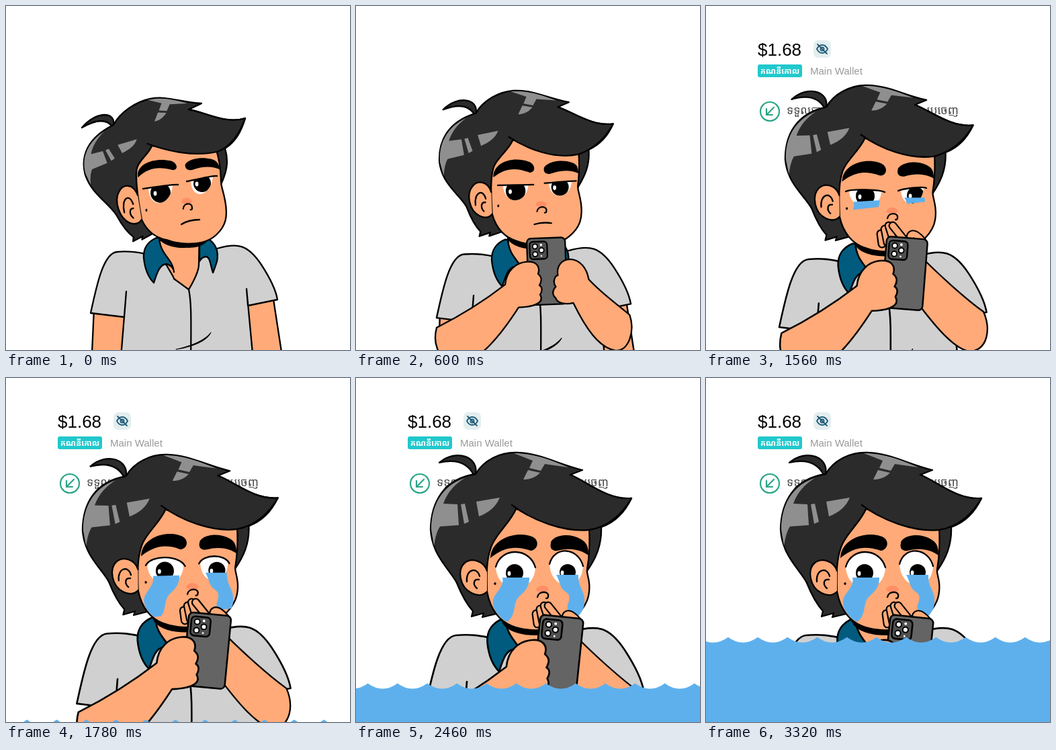
An HTML page that plays this animation: 512 px wide and 512 px high, repeating every 3.34 s.

```html
<!DOCTYPE html>
<html lang="en">
<head>
<meta charset="utf-8">
<title>Wallet tears</title>
<style>
  html, body { margin: 0; width: 100%; height: 100%; overflow: hidden; background: #fff; }
  svg { display: block; width: 100vw; height: 100vh; }
  text { font-family: "Liberation Sans", Arial, sans-serif; }
  .khmer { font-family: "Noto Sans Khmer", "Noto Sans", sans-serif; }
  .ink { stroke: #000; stroke-width: 2.3; stroke-linejoin: round; stroke-linecap: round; }
  .line { fill: none; }
  .skin { fill: #ffaa78; }
  .shirt { fill: #d0d0d0; }
  .collar { fill: #005b7f; }
  .hair { fill: #2b2b2b; }
  .shine { fill: #8f8f8f; }
  .tear { fill: #5eb0ed; }
  .blush { fill: #ff8f66; }
</style>
</head>
<body>
<svg viewBox="0 0 512 512">
  <defs>
    <clipPath id="tearClip"><path/></clipPath>
    <clipPath id="eyeClip0"><path/></clipPath>
    <clipPath id="eyeClip1"><path/></clipPath>
  </defs>

  <g id="wallet">
    <text x="77" y="74" font-size="26">$1.68</text>
    <rect x="160" y="51" width="26" height="26" rx="7" fill="#e3eeef"/>
    <g fill="none" stroke="#1f5a78" stroke-width="1.8" stroke-linecap="round">
      <path d="M165,64C169,56 177,56 181,64C177,72 169,72 165,64zM166,57L180,71"/>
      <circle cx="173" cy="64" r="2.6"/>
    </g>
    <rect x="77" y="87" width="66" height="19" rx="3" fill="#20c8cc"/>
    <text class="khmer" x="110" y="101" font-size="12" font-weight="600" fill="#fff" text-anchor="middle">គណនីគោល</text>
    <text x="155" y="102" font-size="15" fill="#999">Main Wallet</text>
    <g fill="none" stroke="#2aa587" stroke-width="2.2" stroke-linecap="round">
      <circle cx="95" cy="157" r="14"/>
      <path d="M101,151L90,162M90,153V162H99"/>
    </g>
    <g class="khmer" font-size="17" font-weight="500" fill="#444">
      <text class="khmer" x="120" y="161">ទទួលបាន</text>
      <text class="khmer" x="376" y="161" text-anchor="end">ប្រចេញ</text>
    </g>
  </g>

  <g id="body" class="ink">
    <g id="upperArms" class="skin">
      <path d="M131,450L126,560H170L178,440z"/>
      <path d="M358,430L371,560H417L397,430z"/>
    </g>
    <path class="shirt" d="M126,457C135,415 145,368 165,366C185,364 198,367 208,369L270,385L314,361C345,352 360,355 380,385C395,408 402,425 404,437L360,446L358,421L371,560H168L179,425L176,463z"/>
    <path class="skin" d="M228,335L229,362C235,385 248,398 250,406L272,422C282,405 287,392 287,385L288,335z"/>
    <path class="collar" d="M224,345C212,350 204,360 205,375C207,395 213,405 220,412C224,400 228,385 238,384C246,385 250,392 250,396C248,375 230,372 228,345z"/>
    <path class="collar" d="M299,345C312,353 317,365 314,380C311,390 309,394 308,397C304,385 304,373 297,373C291,374 289,378 288,380L288,345z"/>
    <path class="line" d="M272,422C277,445 275,480 275,560"/>
    <path d="M253,511C280,505 297,496 305,486C298,500 275,508 253,511z" stroke-width="1"/>
  </g>

  <g id="headBack"></g>
  <g id="eyes"></g>
  <g id="headFront"></g>
  <path id="mouth" class="ink line"/>

  <g id="coverArm">
    <path class="ink skin" d="M325,378C345,398 385,435 413,455C424,480 420,512 393,514C370,512 340,475 318,446z"/>
    <g id="fingers" fill="none" stroke-linecap="round"></g>
  </g>

  <g id="phone" class="ink">
    <rect x="-28.5" y="-49.5" width="57" height="99" rx="6" fill="#646464"/>
    <rect x="-24.5" y="-44.5" width="26" height="26" rx="5" fill="#505050"/>
    <g fill="#fff" stroke-width="1.8">
      <circle cx="-16.5" cy="-37.5" r="3.6"/>
      <circle cx="-16.5" cy="-26" r="3.6"/>
      <circle cx="-7" cy="-31.5" r="3.6"/>
      <circle cx="-7.5" cy="-39.5" r="1.8" stroke="none"/>
      <circle cx="-7.5" cy="-23" r="1.3" stroke="none"/>
    </g>
  </g>

  <path id="holdArm" class="ink skin" d="M345,393C365,415 390,432 406,446C414,470 405,500 385,499C360,495 340,465 322,428C312,431 298,429 296,421C290,416 291,409 296,404C291,398 294,388 299,387C297,375 303,363 318,363C332,364 342,376 345,393z"/>
  <path id="leftArm" class="ink skin" d="M222,399C195,420 160,443 120,463C113,490 125,512 150,520C185,512 215,475 242,433C270,432 280,424 274,414C278,408 277,402 273,400C277,393 277,388 271,383C275,372 268,364 255,365C238,366 224,378 222,399z"/>
  <path id="water" fill="#5eb0ed"/>
</svg>

<script>
const LOOP = 3340;
const SWAP = 1260;
const TIMES = [0, 400, 940, 1080, 1560, 2040];
const $ = id => document.getElementById(id);
const clamp = v => Math.max(0, Math.min(1, v));

function add(parent, tag, attrs) {
  const node = document.createElementNS('http://www.w3.org/2000/svg', tag);
  for (const name in attrs) node.setAttribute(name, attrs[name]);
  return parent.appendChild(node);
}
const set = (node, name, value) => node.setAttribute(name, value);

// Monotone cubic curve through the key values; flat at both ends.
function curve(times, values) {
  const rate = i => (values[i + 1] - values[i]) / (times[i + 1] - times[i]);
  const slopes = values.map((_, i) => {
    if (i === 0 || i === values.length - 1) return 0;
    const a = rate(i - 1), b = rate(i);
    return a * b > 0 ? 2 * a * b / (a + b) : 0;
  });
  return t => {
    if (t >= times[times.length - 1]) return values[values.length - 1];
    const i = times.findIndex((_, k) => t < times[k + 1]);
    const span = times[i + 1] - times[i], u = (t - times[i]) / span, v = 1 - u;
    return values[i] * v * v * (1 + 2 * u) + values[i + 1] * u * u * (1 + 2 * v)
      + span * u * v * (slopes[i] * v - slopes[i + 1] * u);
  };
}

// Five poses; the third one is held for a moment.
function track(p0, p1, p2, p3, p4) {
  const rows = [p0, p1, p2, p2, p3, p4];
  const curves = p0.map((_, c) => curve(TIMES, rows.map(row => row[c])));
  return t => curves.map(f => f(t));
}

// Thin-plate spline that carries the src points to the dst points.
function warp(src, dst) {
  const bend = (p, q) => {
    const r = (p[0] - q[0]) ** 2 + (p[1] - q[1]) ** 2;
    return r ? r * Math.log(r) : 0;
  };
  const basis = p => [...src.map(q => bend(p, q)), 1, p[0], p[1]];
  const rows = src.map((p, i) => [...basis(p), ...dst[i]]);
  for (let k = 0; k < 3; k++) rows.push([...src.map(p => [1, ...p][k]), 0, 0, 0, 0, 0]);
  const n = rows.length;
  for (let c = 0; c < n; c++) {
    let best = c;
    for (let r = c; r < n; r++) if (Math.abs(rows[r][c]) > Math.abs(rows[best][c])) best = r;
    [rows[c], rows[best]] = [rows[best], rows[c]];
    rows[c] = rows[c].map(v => v / rows[c][c]);
    rows.forEach((row, r) => {
      if (r !== c) rows[r] = row.map((v, k) => v - row[c] * rows[c][k]);
    });
  }
  return p => [n, n + 1].map(k => basis(p).reduce((sum, v, i) => sum + v * rows[i][k], 0));
}

// Head landmarks: upright, reading, leaning in.
const MARKS = [
  [113,181, 131,152, 124,126], [160,177, 180,158, 178,143], [215,138, 236,125, 240,111],
  [291,145, 319,143, 337,137], [272,154, 303,150, 319,144], [356,167, 385,176, 410,179],
  [211,205, 229,194, 232,189], [314,217, 333,221, 347,226], [126,266, 131,252, 116,250],
  [144,216, 158,197, 151,188], [190,350, 184,342, 173,355], [181,302, 184,291, 172,299],
  [209,304, 212,297, 207,306], [228,346, 226,346, 218,364], [262,352, 262,354, 262,375],
  [327,297, 336,300, 347,310], [270,297, 277,302, 278,322], [255,239, 267,243, 270,249],
  [266,238, 280,243, 289,246], [320,262, 331,268, 344,285], [326,212, 348,214, 365,222],
  [197,254, 206,254, 201,267]
];
const pose = k => MARKS.map(m => m.slice(2 * k, 2 * k + 2));
const warps = [warp(pose(2), pose(0)), warp(pose(2), pose(1)), p => p];

const headParts = [];
function part(group, cls, d) {
  const points = d.match(/[\d.]+,[\d.]+/g).map(s => s.split(',').map(Number));
  headParts.push({
    node: add($(group), 'path', { class: cls }),
    shape: d.replace(/[\d.]+,[\d.]+/g, '@'),
    poses: warps.map(w => points.map(w))
  });
  return headParts[headParts.length - 1].node;
}
const back = (cls, d) => part('headBack', cls, d);
const front = (cls, d) => part('headFront', cls, d);

back('ink hair', 'M178,143C183,118 150,104 124,126C146,121 166,124 176,146z');
back('ink hair', 'M178,143C190,122 215,110 240,111C275,112 300,128 337,137L319,144C345,155 375,182 410,179C400,200 385,215 365,222C366,250 356,270 344,287L300,250L230,330L209,351L188,356L190,350L172,355L174,347C166,338 158,325 150,305C140,285 113,265 111,225C112,185 130,150 178,143z');
back('', 'M216,360C220,376 246,384 270,383C295,382 306,374 314,362z');
back('ink skin', 'M238,195C230,215 205,235 200,255C195,270 194,285 195,318C200,345 214,362 232,369C255,378 300,380 325,357C343,340 349,325 347,305C346,295 343,290 344,285C348,262 348,240 347,222z');
back('ink skin', 'M195,287C190,272 172,267 162,275C150,285 154,311 172,320C182,325 190,323 195,318');
back('ink line', 'M165,303C163,285 180,280 184,295M183,300C174,299 174,308 180,313');
back('', 'M200,268C200,242 235,226 262,236C274,241 271,256 260,257C240,250 222,250 200,268z');
back('', 'M290,246C290,236 315,228 335,240C343,245 346,250 346,264C335,256 320,252 300,257C292,258 288,253 290,246z');
back('blush', 'M268,315C270,307 285,307 287,315C285,320 270,320 268,315z');
back('', 'M205.3,306C205.3,303.5 208.7,303.5 208.7,306C208.7,308.5 205.3,308.5 205.3,306z');

const tears = [
  'M218,297L258,297C258,311 252,317 244,324C232,334 240,352 225,363C213,357 202,342 204,331C206,319 221,312 218,297z',
  'M298,293L331,293C330,312 341,316 340,332C341,342 334,352 329,356C320,352 313,347 315,338C318,329 320,323 312,318C303,313 304,303 298,293z'
].map(d => front('tear', d));
tears.forEach(tear => set(tear, 'clip-path', 'url(#tearClip)'));
front('ink line', 'M270,326C272,316 288,317 286,325C286,327 285,328 283,328');
front('ink hair', 'M232,189C262,212 310,230 347,226C375,222 397,202 410,179C375,182 345,155 319,144');
front('shine', 'M235,112C265,112 290,122 316,133L281,128L275,138L258,134L263,123z');
front('shine', 'M256,137L274,141C266,149 258,151 249,151z');
front('shine', 'M162,149C128,160 112,190 112,225L116,250C118,236 121,227 125,221L153,219L151,188L130,187C136,170 148,157 162,149z');
front('shine', 'M156,188L162,187L168,214L161,217z');
front('shine', 'M179,184L214,178C208,192 198,200 183,206z');

function drawHead(lean) {
  const k = lean < 1 ? 0 : 1, u = lean - k;
  for (const { node, shape, poses } of headParts) {
    let i = 0;
    set(node, 'd', shape.replace(/@/g, () => {
      const a = poses[k][i], b = poses[k + 1][i++];
      return a.map((v, c) => (v + (b[c] - v) * u).toFixed(2)).join();
    }));
  }
}

// Lid left x,y, lid right x,y, lid arch, inset, depth, pupil x,y,r.
const eyes = [
  track([204,272,256,266,1,8,32,230,278,15], [211,265,263,264,0,8,33,236,275,15],
    [211,271,265,270,0,7,25,239,276,14], [208,276,266,277,4,5,30,237,283,14],
    [208,281,267,282,30,0,42,236,290,13]),
  track([269,261,314,253,1,6,30,292,264,13], [278,262,327,257,0,7,30,301,268,13],
    [283,266,328,265,1,5,22,306,271,13], [286,275,328,271,3,4,28,312,282,13],
    [288,277,338,280,28,0,40,315,289,12])
].map((values, i) => {
  const clip = { 'clip-path': `url(#eyeClip${i})` };
  return {
    values,
    clip: document.querySelector(`#eyeClip${i} path`),
    white: add($('eyes'), 'path', { fill: '#fff' }),
    pupil: add(add($('eyes'), 'g', clip), 'circle', {}),
    glint: add(add($('eyes'), 'g', clip), 'ellipse', { rx: 2.4, ry: 3.4, fill: '#fff' }),
    lid: add($('eyes'), 'path', { class: 'ink line' })
  };
});

function drawEye(eye, t) {
  const [lx, ly, rx, ry, arch, inset, depth, px, py, r] = eye.values(t);
  const w = (rx - lx) * .14;
  const lid = (a, b) => `M${a},${ly}C${a + w},${ly - arch} ${b - w},${ry - arch} ${b},${ry}`;
  const a = lx + inset, b = rx - inset;
  const white = lid(a, b) + `C${b - 2},${ry + depth} ${a + 2},${ly + depth} ${a},${ly}z`;
  set(eye.white, 'd', white);
  set(eye.clip, 'd', white);
  set(eye.lid, 'd', lid(lx, rx));
  set(eye.pupil, 'cx', px);
  set(eye.pupil, 'cy', py);
  set(eye.pupil, 'r', r);
  set(eye.glint, 'cx', px - 8);
  set(eye.glint, 'cy', py + 1);
}

for (const d of ['M305,352C301,338 309,334 322,350', 'M262,354L260,339', 'M270,352L266,332',
  'M280,352L272,327', 'M298,352L278,327']) {
  add($('fingers'), 'path', { d, stroke: '#000', 'stroke-width': 13 });
  add($('fingers'), 'path', { d, stroke: '#ffaa78', 'stroke-width': 8.6 });
}

const lean = track([0], [.82], [1], [1.5], [2]);
const body = track([126,366,1], [121,369,1.032], [119,370,1.047], [109,377,1.11], [103,383,1.17]);
const leftArm = track([276,560,1], [276,401,1], [276,365,1], [284,379,1.1], [287,390,1.17]);
const holdArm = track([2,195], [2,32], [0,0], [0,0], [0,0]);
const coverArm = track([-5,-12], [-5,-12], [-5,-12], [0,0], [8,12]);
const phone = track([280,600,-8,1], [283,415,-4,1], [285.5,379.5,0,1], [295.5,398,4.5,1.07], [301,411,6,1.13]);
const mouth = track([261,325,272,318,288,318], [263,325,275,320,292,322], [269,325,278,323,288,324],
  [269,332,278,330,288,331], [269,340,278,338,288,339]);
const tearEnd = curve([1380, 1560, 2060], [276, 298, 400]);

function place(id, [x, y, scale], ox, oy) {
  set($(id), 'transform', `translate(${x},${y})scale(${scale})translate(${-ox},${-oy})`);
}
const show = (id, on) => { $(id).style.display = on ? '' : 'none'; };

function drawWater(t) {
  const period = 44.2, crest = 480 - (t - 2140) * .0797;
  const phase = 33 - (t - 3320) * .085;
  let x = phase - Math.ceil(phase / period + 1) * period;
  let d = `M${x},${crest}`;
  for (; x < 512; x += period) d += `Q${x + period / 2},${crest + 16} ${x + period},${crest}`;
  set($('water'), 'd', d + `V${Math.max(crest, 520)}H-100z`);
  show('water', crest < 512);
}

function draw(t) {
  set($('wallet'), 'opacity', clamp((t - 1060) / 200));
  place('body', body(t), 126, 366);
  show('upperArms', t < 650);
  drawHead(lean(t));
  eyes.forEach(eye => drawEye(eye, t));

  const end = t < 1380 ? 0 : tearEnd(t);
  set(document.querySelector('#tearClip path'), 'd', `M0,0H512V${end - 27}L0,${end + 29}z`);

  const [x1, y1, cx, cy, x2, y2] = mouth(t);
  set($('mouth'), 'd', `M${x1},${y1}Q${cx},${cy} ${x2},${y2}`);
  show('mouth', t < SWAP);

  const [px, py, tilt, size] = phone(t);
  set($('phone'), 'transform', `translate(${px},${py})rotate(${tilt})scale(${size})`);
  place('leftArm', leftArm(t), 276, 365);
  set($('holdArm'), 'transform', `translate(${holdArm(t)})`);
  set($('coverArm'), 'transform', `translate(${coverArm(t)})`);
  show('holdArm', t < SWAP);
  show('coverArm', t >= SWAP);
  drawWater(t);
}

function tick() {
  draw(performance.now() % LOOP);
  requestAnimationFrame(tick);
}
tick();
</script>
</body>
</html>
```
